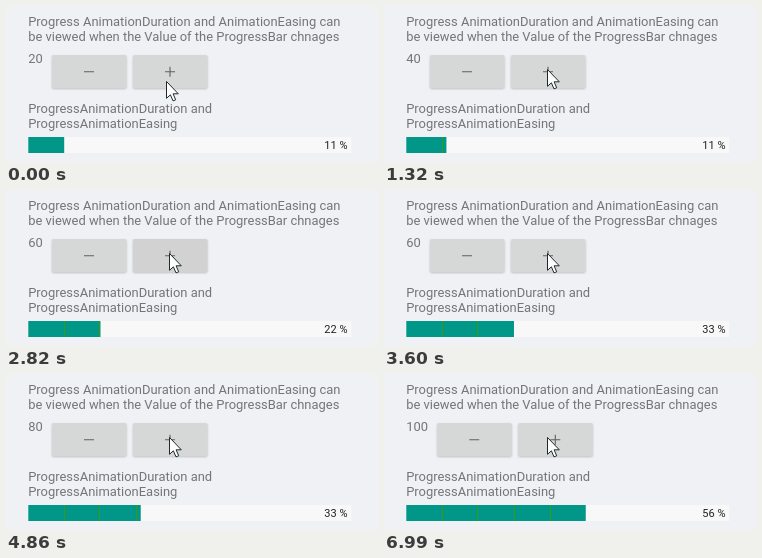
These frames come from a looping animation (372 by 156 pixels, 7560 ms). An HTML page:

```html
<!DOCTYPE html>
<html lang="en">
<head>
<meta charset="utf-8">
<title>Progress animation</title>
<style>
  html, body { margin: 0; width: 372px; height: 156px; overflow: hidden; background: #eff1f5; }
  svg { display: block; }
  text { font: 12.94px Roboto, sans-serif; fill: #757575; }
  #label { font-size: 11px; fill: #222; }
  .key { fill: #d6d7d7; filter: drop-shadow(0 1px 1px #0003); }
  .sign { stroke: #606060; stroke-width: 1.1; }
</style>
</head>
<body>
<svg width="372" height="156">
  <clipPath id="clip"><rect x="127" y="49" width="74.4" height="33" rx="1.5"/></clipPath>
  <text x="22.2" y="20">Progress AnimationDuration and AnimationEasing can</text>
  <text x="22.2" y="35">be viewed when the Value of the ProgressBar chnages</text>
  <text x="22.2" y="57" id="value"></text>
  <g id="keys">
    <rect class="key" x="46" y="49" width="74.4" height="33" rx="1.5"/>
    <rect class="key" x="127" y="49" width="74.4" height="33" rx="1.5"/>
    <circle id="ripple" cx="163" cy="65.5" fill="#cbcccc" clip-path="url(#clip)"/>
    <path class="sign" d="M78 65.8h10M159 65.8h10M164 60.8v10"/>
  </g>
  <text x="22.2" y="107">ProgressAnimationDuration and</text>
  <text x="22.2" y="122">ProgressAnimationEasing</text>
  <rect x="22.3" y="131" width="323" height="16" fill="#f8f8f8"/>
  <rect id="bar" x="22.3" y="131" height="16" fill="#009688"/>
  <path id="seams" stroke="#3a9a18"/>
  <text id="label" x="341.5" y="143" text-anchor="end"></text>
  <path id="cursor" d="M.5.5v16.8l3.9-3.5 2.6 6.1 2.7-1.1-2.6-6h5.2z" fill="#fff" stroke="#1c2a2c"/>
</svg>
<script>
const LOOP = 7560, STEP = 30, MAX = 180, LEFT = 22.3, WIDTH = 323;
// Each click: press time, start of the eased fill, moment it settles
const clicks = [[840, 830, 1830], [2550, 2590, 3600], [4350, 4350, 5280], [6000, 6000, 6990]];
const seamXs = [58, 93, 130, 166];
const $ = id => document.getElementById(id);
const clamp = x => Math.max(0, Math.min(1, x));

function draw(t) {
  let value = 20, settled = 20, fill = 20, age = Infinity;
  for (const [press, start, end] of clicks) {
    if (t < press) break;
    value += 20;
    age = t - press;
    fill = t >= end ? value : settled + 20 * clamp((t - start) / 1000) ** 3;
    if (t >= end) settled = value;
  }
  $('value').textContent = value;
  $('label').textContent = Math.round(settled / MAX * 100) + ' %';
  $('keys').setAttribute('transform', `translate(${value > 99 ? 7.3 : 0})`);

  const width = WIDTH * fill / MAX;
  $('bar').setAttribute('width', width);
  $('seams').setAttribute('d', seamXs.filter(x => x + .5 < LEFT + width)
    .map(x => `M${x + .5} 131v16`).join('') || 'M0 0');

  $('ripple').setAttribute('r', 26 + 16 * clamp(age / 210));
  $('ripple').setAttribute('opacity', 1 - clamp((age - 120) / 270));

  const move = clamp(t / 120);
  const y = 75 - 11 * move - (t >= 360);
  $('cursor').setAttribute('transform', `translate(${Math.round(160 + 3 * move)} ${Math.round(y)})`);
}

function tick() {
  draw(Math.floor(performance.now() % LOOP / STEP) * STEP);
  requestAnimationFrame(tick);
}
tick();
</script>
</body>
</html>
```
